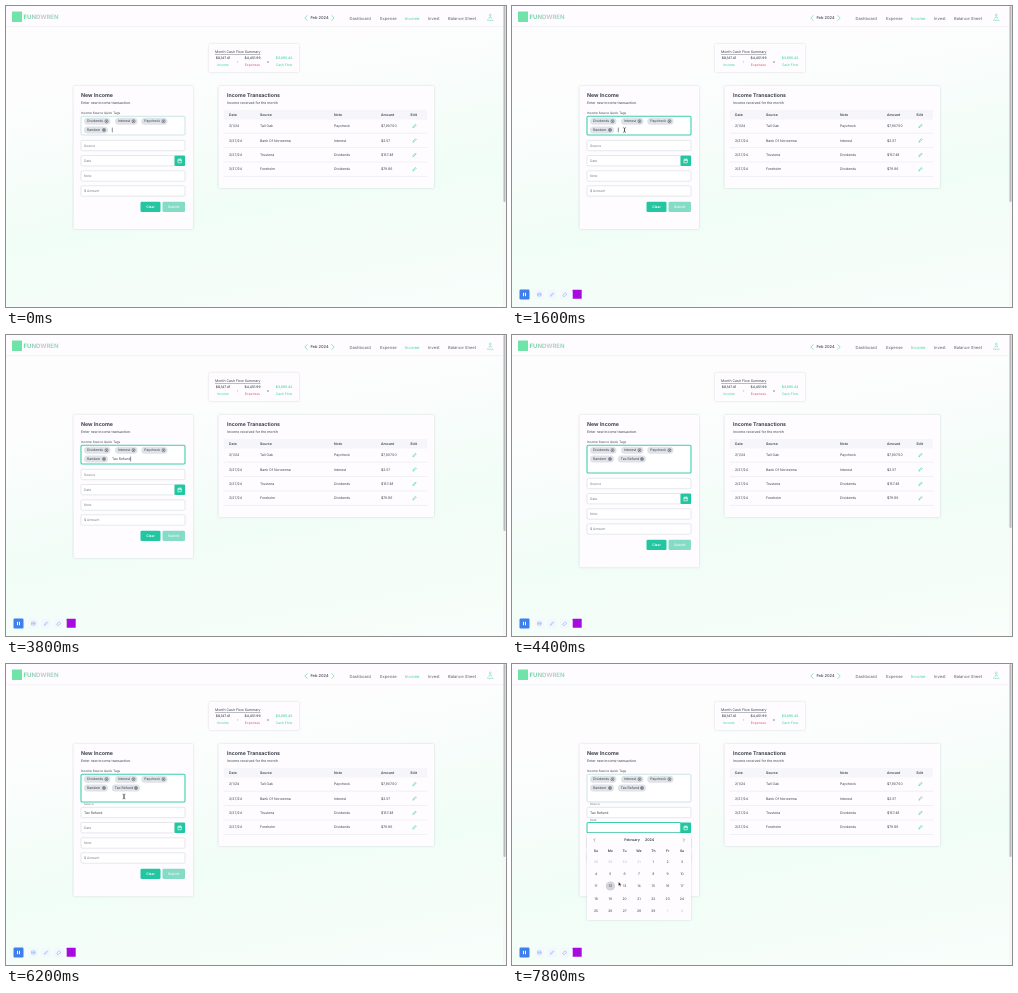
Recreate the animation shown at these times as an HTML page. Size 500 by 301 pixels, loop 8000 ms.

```html
<!DOCTYPE html>
<html lang="en">
<head>
<meta charset="utf-8">
<title>Income form</title>
<style>
  html, body { margin: 0; width: 100%; height: 100%; overflow: hidden; }
  svg { display: block; width: 100vw; height: 100vh; background: linear-gradient(170deg, #fefdfe 22%, #f1fdf7 62%, #f9fefb 100%); }
  text { font-family: Inter, Roboto, sans-serif; text-rendering: geometricPrecision; white-space: pre; }
  .card { fill: #fefcfe; filter: drop-shadow(0 .6px .9px rgba(60, 60, 80, .2)); }
  .field { fill: #fff; stroke: #d3d8df; stroke-width: .6; }
  .line { fill: none; stroke-width: .6; stroke-linecap: round; stroke-linejoin: round; }
</style>
</head>
<body>
<svg id="stage" viewBox="0 0 500 301" preserveAspectRatio="none"></svg>
<script>
const LOOP = 8000, STEP = 200;
const TEAL = '#22c7a1', GREEN = '#35d995', INK = '#3d4350', GREY = '#737a85', RED = '#f0506a';
const TYPED = 'Tax Refund';

// Markup helpers; text is placed by its vertical centre.
const text = (x, y, s, { size = 3.45, fill = INK, weight = 400, anchor = 'start', extra = '' } = {}) =>
  `<text x="${x}" y="${y + size * .36}" font-size="${size}" fill="${fill}" font-weight="${weight}" text-anchor="${anchor}" ${extra}>${s}</text>`;
const mid = (x, y, s, opts) => text(x, y, s, { anchor: 'middle', ...opts });
const rect = (x, y, w, h, fill, r = 1, extra = '') =>
  `<rect x="${x}" y="${y}" width="${w}" height="${h}" rx="${r}" fill="${fill}" ${extra}/>`;
const box = (cls, x, y, w, h, id = '') =>
  `<rect class="${cls}" ${id && `id="${id}"`} x="${x}" y="${y}" width="${w}" height="${h}" rx="1.3"/>`;
const line = (d, color, width = .6) => `<path class="line" d="${d}" stroke="${color}" stroke-width="${width}"/>`;
const group = (id, body) => `<g id="${id}">${body}</g>`;
const chevron = (x, y, dir, color, h = 2.4) => line(`M${x - dir * h / 2} ${y - h}l${dir * h} ${h}l${-dir * h} ${h}`, color);
const pencil = (x, y, color) => line(`M${x - 1.5} ${y + 1.5}l.4 -1.2l2 -2l.8 .8l-2 2z`, color, .5);

function chip(x, y, w, label) {
  const cx = x + w - 4;
  return rect(x, y - 3.5, w, 7, '#dfe2e7', 3.5) + text(x + 3, y, label) +
    `<circle cx="${cx}" cy="${y}" r="1.6" fill="none" stroke="${INK}" stroke-width=".45"/>` +
    line(`M${cx - .6} ${y - .6}l1.2 1.2m0 -1.2l-1.2 1.2`, INK, .4);
}

function navBar() {
  const links = [[343.5, 'Dashboard'], [374, 'Expense'], [399, 'Income'], [422, 'Invest'], [442, 'Balance Sheet']];
  return rect(0, 0, 497, 20.5, '#fefcfe', 0) + line('M0 20.6H497', '#ececf0', .5) +
    rect(6, 5.5, 10, 10.5, '#6fe3a8', .5) +
    text(17.5, 11, 'FUNDWREN', { size: 6, weight: 700, fill: 'url(#brand)' }) +
    chevron(300, 12, -1, GREEN) + chevron(327, 12, 1, GREEN) +
    mid(313.5, 12, 'Feb 2024', { size: 4, weight: 500 }) +
    links.map(([x, s]) => text(x, 12.5, s, { size: 4.15, fill: s === 'Income' ? GREEN : '#5c626d' })).join('') +
    `<circle cx="484.3" cy="9" r="1" fill="none" stroke="${GREEN}" stroke-width=".4"/>` +
    line('M482.8 12q1.5 -2.4 3 0', GREEN, .4) + mid(484.3, 14, 'Demo', { size: 2.3, fill: GREEN });
}

function summary() {
  const parts = [[217, '$8,147.41', 'Income', INK, GREEN], [246.5, '$4,451.99', 'Expenses', INK, RED], [278, '$3,695.42', 'Cash Flow', GREEN, GREEN]];
  return box('card', 203, 38, 90, 28) +
    text(209, 46, 'Month Cash Flow Summary', { size: 3.5, extra: 'text-decoration="underline"' }) +
    parts.map(([x, sum, name, c1, c2]) =>
      mid(x, 52, sum, { size: 3.35, fill: c1, weight: 500 }) + mid(x, 58.5, name, { size: 3.35, fill: c2 })).join('') +
    mid(231.5, 55.5, '-', { weight: 600 }) + mid(262, 55.5, '=', { weight: 600 });
}

function transactions() {
  const cols = [223, 254, 328, 375, 404.5];
  const rows = [
    ['2/1/24', 'Tall Oak', 'Paycheck', '$7,907.50'],
    ['2/27/24', 'Bank Of Norwenna', 'Interest', '$2.57'],
    ['2/27/24', 'Trustona', 'Dividends', '$157.48'],
    ['2/27/24', 'Foreholm', 'Dividends', '$79.86']];
  const cells = (row, y, weight) => row.map((s, i) => text(cols[i], y, s, { weight })).join('');
  return box('card', 212.5, 80, 215.5, 102) +
    text(221, 89.5, 'Income Transactions', { size: 5.2, weight: 700 }) +
    text(221, 96.8, 'Income received for the month', { size: 3.5 }) +
    rect(218, 104, 203, 9.5, '#f6f6fa', 0) +
    cells(['Date', 'Source', 'Note', 'Amount', 'Edit'], 108.8, 600) +
    rows.map((row, i) => {
      const y = 120 + i * 14.4;
      return cells(row, y, 400) + pencil(408.5, y, GREEN) + line(`M218 ${y + 7.2}H421`, '#e6e7ec', .5);
    }).join('');
}

function form() {
  const fields = [[139.5, 'Source'], [154.7, 'Date'], [170, 'Note'], [185, '$ Amount']];
  const placeholder = { size: 3.35, fill: GREY };
  return box('card', 67.5, 80, 119.5, 143, 'formCard') +
    text(75, 89.5, 'New Income', { size: 5.3, weight: 700 }) +
    text(75, 96.8, 'Enter new income transaction.', { size: 3.5 }) +
    text(75, 106.5, 'Income Source Quick Tags', { size: 3.1 }) +
    box('field', 75, 110.3, 104, 18.7, 'tagBox') +
    chip(78, 115.2, 26.5, 'Dividends') + chip(109, 115.2, 22.5, 'Interest') + chip(135.3, 115.2, 26.2, 'Paycheck') +
    chip(78, 124, 24, 'Random') + group('newChip', chip(105.8, 124, 28.2, TYPED)) +
    text(106, 124, '', { extra: 'id="typing"' }) +
    group('lower',
      fields.map(([y, s], i) => box('field', 75, y - 5.2, i === 1 ? 94 : 104, 10.4, 'field' + i) +
        text(78, y, s, { ...placeholder, extra: `id="label${i}"` })).join('') +
      text(78, 139.7, TYPED, { extra: 'id="sourceValue"' }) +
      rect(168.5, 149.4, 10.6, 10.6, TEAL) +
      line('M172.3 153.4h3v3.4h-3zM172.3 154.5h3M173 152.8v.6M174.6 152.8v.6', '#fff', .45) +
      rect(134.5, 195.7, 20, 10.4, TEAL, 1.3) + mid(144.5, 201, 'Clear', { size: 3.4, fill: '#fff', weight: 600 }) +
      rect(156.5, 195.7, 22.5, 10.4, '#84dcc6', 1.3) + mid(167.8, 201, 'Submit', { size: 3.4, fill: '#e6f8f3', weight: 600 }));
}

function calendar() {
  const colX = i => 84 + i * 14.33;
  const rowY = [197.6, 210, 222.2, 234.5, 247];
  const days = Array.from({ length: 35 }, (_, i) => {
    const d = i - 3, inside = d >= 1 && d <= 29;
    const label = inside ? d : d < 1 ? d + 31 : d - 29;
    return mid(colX(i % 7), rowY[Math.floor(i / 7)], label, { size: 3.4, fill: inside ? INK : '#b9bdc5' });
  });
  return box('card', 75, 169, 104, 87) +
    chevron(82.3, 176, -1, GREY, 1.3) + chevron(172, 176, 1, GREY, 1.3) +
    mid(120, 176, 'February', { size: 3.6, weight: 600 }) + mid(137.5, 176, '2024', { size: 3.6, weight: 600 }) +
    ['Su', 'Mo', 'Tu', 'We', 'Th', 'Fr', 'Sa'].map((s, i) => mid(colX(i), 187.2, s, { size: 3.4, weight: 600 })).join('') +
    `<circle cx="${colX(1)}" cy="222" r="4.6" fill="#d3d3da"/>` + days.join('');
}

function toolbar() {
  const blue = '#8fb3ee';
  return rect(7.5, 283.5, 10, 10, '#3f7fec', 1.2) + rect(11, 286.8, 1, 3.4, '#fff', 0) + rect(13, 286.8, 1, 3.4, '#fff', 0) +
    [27.5, 40, 52.7].map(x => rect(x - 4.7, 283.7, 9.4, 9.6, '#f3f8fd', 1)).join('') +
    line('M26 287h3v3h-3zM26 288.5h3', blue) + pencil(40, 288.5, blue) +
    line('M51 289l2 -2.2l1.7 1.4l-2 2.2h-1z', blue) +
    rect(60.7, 283.8, 9, 9, '#a80be0', .4);
}

document.getElementById('stage').innerHTML =
  `<defs><linearGradient id="brand"><stop stop-color="#52dc98"/><stop offset=".5" stop-color="#cfc6d0"/><stop offset="1" stop-color="#8edbb5"/></linearGradient></defs>` +
  navBar() + summary() + transactions() + form() +
  line('', INK, .5).replace('<path', '<path id="caret"') +
  group('calendar', calendar()) + group('toolbar', toolbar()) +
  rect(497, 0, 3, 301, '#f7f7f8', 0) + rect(497.5, 0, 2, 196, '#b9babd', 1, 'id="thumb"') +
  group('beam', line('M-1 -2.3q1 0 1 .7v3.2q0 .7 -1 .7M1 -2.3q-1 0 -1 .7v3.2q0 .7 1 .7', '#333', .5)) +
  group('arrow', '<path d="M0 0v4l1 -.9l.7 1.5l.7 -.3l-.7 -1.5h1.3z" fill="#111" stroke="#fff" stroke-width=".3"/>');

const $ = id => document.getElementById(id);
const show = (id, on) => $(id).setAttribute('visibility', on ? 'visible' : 'hidden');
const outline = (id, color, width) => { $(id).style.stroke = color; $(id).style.strokeWidth = width; };

// Pointer path: time, x, y
const PATH = [[200, 112.5, 124], [1600, 112.5, 124], [3000, 114, 124], [4800, 114, 124], [5400, 118, 124.5],
  [5800, 118, 124.5], [6200, 118, 132.5], [6800, 155.5, 164], [7200, 155.5, 164], [7800, 106.5, 218]];

function pointerAt(t) {
  const i = PATH.findIndex(p => p[0] >= t);
  if (i <= 0) return PATH[0].slice(1);
  const [t0, x0, y0] = PATH[i - 1], [t1, x1, y1] = PATH[i];
  const k = (t - t0) / (t1 - t0);
  return [x0 + (x1 - x0) * k, y0 + (y1 - y0) * k];
}

function render(t) {
  const tagged = t >= 4000, filled = t >= 5600, picking = t >= 7000;
  const tagFocus = t >= 200 && t < 6800;
  const drop = tagged ? 9 : 0;

  $('formCard').setAttribute('height', 143 + drop + (tagged ? .3 : 0));
  $('tagBox').setAttribute('height', 18.7 + drop);
  $('lower').setAttribute('transform', `translate(0 ${drop})`);
  $('thumb').setAttribute('height', tagged ? 193 : 196);
  outline('tagBox', tagFocus ? '#3bd0ab' : '#a9d3d3', tagFocus ? 1.1 : .6);
  outline('field1', picking ? '#3bd0ab' : '#d3d8df', picking ? 1.1 : .6);
  show('newChip', tagged);
  show('toolbar', t >= 200);

  const count = Math.max(0, Math.min(TYPED.length, Math.floor((t - 2200) / 160)));
  const typing = $('typing');
  typing.textContent = tagged ? '' : TYPED.slice(0, count);

  show('sourceValue', filled);
  const float = (id, up, y, size, home) => {
    $(id).setAttribute('y', up ? y + 1 : home + 1.2);
    $(id).setAttribute('font-size', up ? size : 3.35);
  };
  float('label0', filled, 131.4, 2.9, 139.5);
  float('label1', picking, t < 7200 ? 149.5 : 146.6, 2.9, 154.7);

  const caretX = picking ? 78 : tagged ? 79 : 106.3 + (count ? typing.getComputedTextLength() : 0);
  const caretY = picking ? 163.7 : tagged ? 132.8 : 124;
  $('caret').setAttribute('d', `M${caretX} ${caretY - 2}v4`);
  const blink = picking ? t % 1000 < 500 : (t + 400) % 1000 < 500 || (count && !tagged);
  show('caret', blink && (t < 6800 || picking));

  // The panel unfolds from its top edge while fading in.
  const open = Math.min(1, .8 + (t - 7000) / 200);
  show('calendar', picking);
  $('calendar').setAttribute('opacity', open);
  $('calendar').setAttribute('transform', `translate(0 169) scale(1 ${.8 + .2 * open}) translate(0 -169)`);

  const [x, y] = pointerAt(t);
  const hidden = t < 200 || (t >= 3800 && t < 4800);
  const overPanel = t > 7200 || (t >= 5200 && t < 6000);
  for (const id of ['beam', 'arrow']) $(id).setAttribute('transform', `translate(${x} ${y})`);
  show('beam', !hidden && !overPanel);
  show('arrow', !hidden && overPanel);
}

const start = performance.now();
function tick() {
  const t = (performance.now() - start) % LOOP;
  render(Math.floor(t / STEP) * STEP);
  requestAnimationFrame(tick);
}
tick();
</script>
</body>
</html>
```
